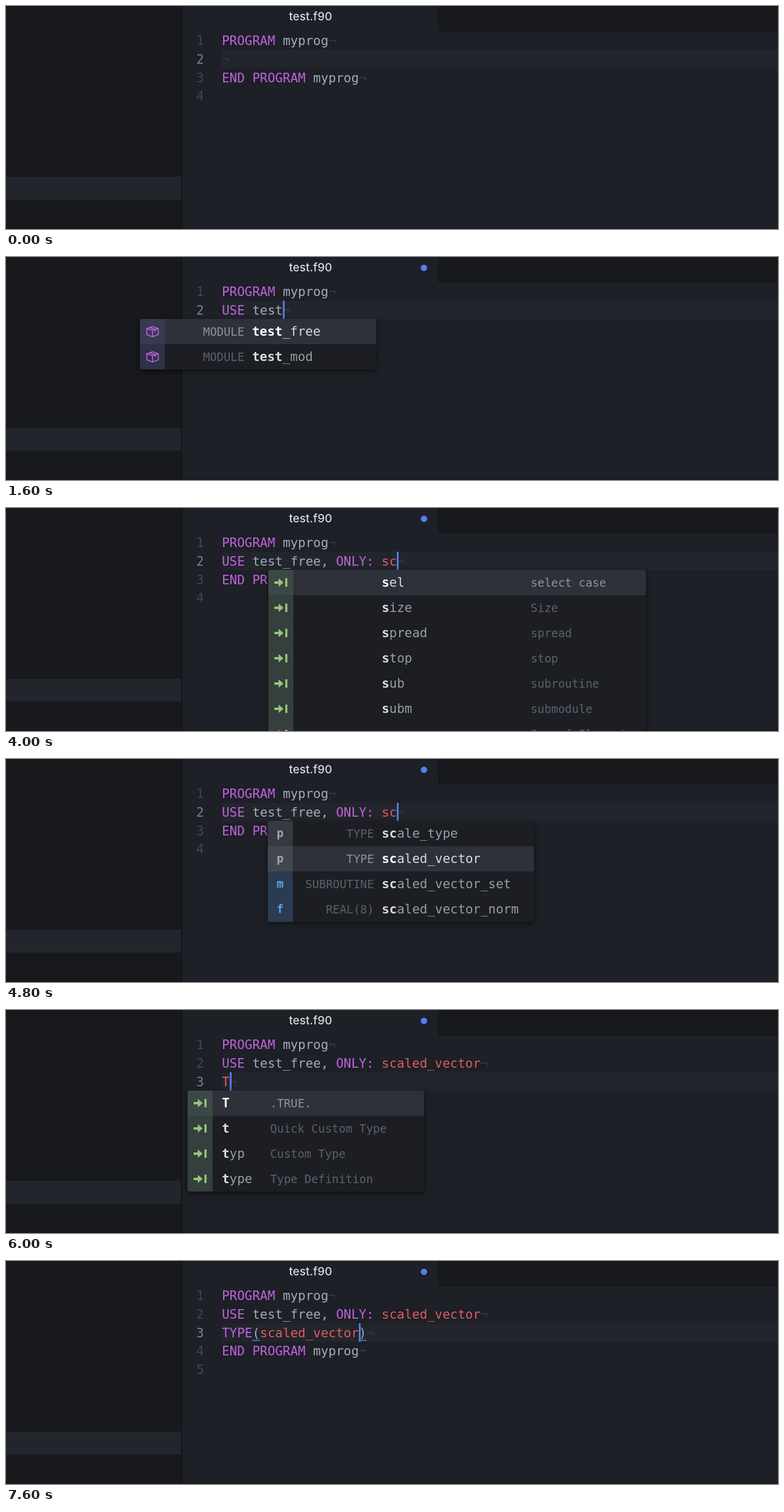
An HTML page with a canvas that plays this animation: 1280x371 px, repeating every 8000 ms.

```html
<!DOCTYPE html>
<html lang="en">
<head>
<meta charset="utf-8">
<title>Editor autocomplete</title>
<style>
  html, body { margin: 0; width: 100%; height: 100%; overflow: hidden; background: #1d2026; }
  canvas { display: block; }
</style>
</head>
<body>
<canvas id="stage" width="1280" height="371"></canvas>
<script>
const ctx = document.getElementById('stage').getContext('2d');
const MONO = '"DejaVu Sans Mono", monospace';
const CODE = `20.95px ${MONO}`, BOLD = `bold ${CODE}`, SMALL = `18.9px ${MONO}`;
const CHAR = 12.613, LEFT = 358, LINE = 30.75, ROW = 42, STEP = 400;
const COLORS = { k: '#c062de', r: '#e05a63', t: '#a3abb9' };

// Suggestion rows: kind, label, word, description
const snippet = (word, info) => ['snippet', '', word, info];
const typeRows = [
  snippet('t', 'Quick Custom Type'), snippet('typ', 'Custom Type'),
  snippet('type', 'Type Definition')];
const truth = snippet('T', '.TRUE.');
const moduleRow = ['module', 'MODULE', 'test_free', ''];
const sRows = [
  snippet('sel', 'select case'), snippet('size', 'Size'), snippet('spread', 'spread'),
  snippet('stop', 'stop'), snippet('sub', 'subroutine'), snippet('subm', 'submodule'),
  snippet('sum', 'Sum of Elements')];
const vectorType = ['p', 'TYPE', 'scaled_vector', ''];
const scRows = [
  ['p', 'TYPE', 'scale_type', ''], vectorType,
  ['m', 'SUBROUTINE', 'scaled_vector_set', ''],
  ['f', 'REAL(8)', 'scaled_vector_norm', '']];
const modRows = [moduleRow, ['module', 'MODULE', 'test_mod', '']];

const popup = (query, rows, x, y, w, wordX, infoX = 0, selected = 0) =>
  ({ query, rows, x, y, w, wordX, infoX, selected });
const modules = query => popup(query, modRows, 222, 103, 392, 408);
const vectors = selected => popup('sc', scRows, 434, 103, 441, 623, 0, selected);

// Each step: second line, inserted third line (or null), caret shown, popup
const USE = 'kUSE|t test_free';
const ONLY = USE + ',|k ONLY:|r ';
const FULL = ONLY + 'scaled_vector';
const steps = [
  ['', null, 0],
  ['', null, 1],
  ['kUSE|t t', null, 1, popup('t', [...typeRows, truth, moduleRow], 268, 103, 490, 408, 541)],
  ['kUSE|t te', null, 1, modules('te')],
  ['kUSE|t test', null, 1, modules('test')],
  [USE, null, 1],
  [USE + ', ', null, 1],
  [USE + ', |rON', null, 0, popup('on',
    [snippet('open', 'Output File'), snippet('open scratch', 'Scratch File')],
    490, 103, 392, 546.6, 722)],
  [USE + ', |rONLY', null, 1],
  [ONLY, null, 1],
  [ONLY + 'sc', null, 1, popup('s', sRows, 435, 103, 626, 623, 870)],
  [ONLY + 'sc', null, 0, vectors(0)],
  [ONLY + 'sc', null, 1, vectors(1)],
  [FULL, null, 0],
  [FULL, '', 1],
  [FULL, 'rT', 1, popup('t', [truth, ...typeRows], 301, 134, 392, 358, 438)],
  [FULL, 'kTYPE', 1],
  [FULL, 'kTYPE|t(|rs|t)', 1, popup('s', sRows, 301, 134, 497, 421, 605)],
  [FULL, 'kTYPE|t(|rscaled|t)', 1, popup('scaled', [vectorType], 280, 134, 392, 421)],
  [FULL, 'kTYPE|t(|rscaled_vector|t)', 1]
];

function rect(x, y, w, h, color) {
  ctx.fillStyle = color;
  ctx.fillRect(x, y, w, h);
}

function text(str, x, y, color, font = CODE, align = 'left') {
  ctx.font = font;
  ctx.textAlign = align;
  ctx.fillStyle = color;
  ctx.fillText(str, x, y);
}

// Draws one code line and returns its length in characters
function codeLine(line, index) {
  const y = 65 + index * LINE;
  let col = 0;
  for (const part of line.split('|').filter(Boolean)) {
    text(part.slice(1), LEFT + col * CHAR, y, COLORS[part[0]]);
    col += part.length - 1;
  }
  text('¬', LEFT + col * CHAR, y, '#343942');
  return col;
}

function drawIcon(kind, x, y) {
  if (kind === 'snippet') {
    ctx.fillStyle = '#98c379';
    ctx.fill(new Path2D(`M${x + 10} ${y - 2}h7v-5l8 7-8 7v-5h-7z M${x + 28} ${y - 7}h3.5v14h-3.5z`));
  } else if (kind === 'module') {
    ctx.strokeStyle = '#c062de';
    ctx.lineWidth = 1.6;
    ctx.stroke(new Path2D(`M${x + 11.5} ${y - 5}l9.5-3.5 9.5 3.5v10l-9.5 4-9.5-4z
      l9.5 3 9.5-3m-9.5 3v11 M${x + 16} ${y - 7}l9.5 3.5v4`));
  } else {
    text(kind, x + 20.5, y + 6, kind === 'p' ? '#a0a5ae' : '#5ba3e6',
      `bold 19px ${MONO}`, 'center');
  }
}

function drawPopup({ query, rows, x, y, w, wordX, infoX, selected }) {
  const iconColors = {
    snippet: ['#353f3c', '#3c4845'], module: ['#2f3145', '#383a4f'],
    p: ['#353940', '#42464f'], m: ['#2b3b52'], f: ['#2b3b52']
  };
  const frame = new Path2D();
  frame.roundRect(x, y, w, rows.length * ROW, 4);
  ctx.save();
  ctx.shadowColor = 'rgba(0,0,0,.55)';
  ctx.shadowBlur = 10;
  ctx.shadowOffsetY = 3;
  ctx.fillStyle = '#1c1e24';
  ctx.fill(frame);
  ctx.restore();
  ctx.save();
  ctx.clip(frame);
  rows.forEach(([kind, label, word, info], i) => {
    const top = y + i * ROW, base = top + 28, active = i === selected;
    if (active) rect(x, top, w, ROW, '#2e313a');
    rect(x, top, 41.5, ROW, iconColors[kind][+active] || iconColors[kind][0]);
    drawIcon(kind, x, top + 21);
    const dim = active ? '#8e929c' : '#5c606a';
    text(label, wordX - 13, base, dim, SMALL, 'right');
    text(info, infoX, base, dim, SMALL);
    let matched = 0;
    [...word].forEach((ch, n) => {
      const hit = ch.toLowerCase() === query[matched];
      if (hit) matched++;
      const color = hit ? (active ? '#ffffff' : '#d7dae0') : (active ? '#d7dae0' : '#989ca6');
      text(ch, wordX + n * CHAR, base, color, hit ? BOLD : CODE);
    });
  });
  ctx.restore();
}

function draw(step) {
  const [second, third, caret, list] = steps[step];
  const lines = ['kPROGRAM|t myprog', second];
  if (third !== null) lines.push(third);
  const current = lines.length - 1;
  lines.push('kEND PROGRAM|t myprog');

  rect(0, 0, 1280, 371, '#1d2026');
  rect(0, 0, 290, 371, '#17191d');
  rect(0, 284, 290, 38, '#22252c');
  rect(290, 0, 2, 371, '#121417');
  rect(717, 0, 563, 42, '#121417');
  rect(718, 0, 562, 41, '#17191d');
  rect(0, 370, 1280, 1, '#131519');
  text('test.f90', 505, 24, '#d7dae0', '500 19px Inter, sans-serif', 'center');
  if (step > 1) {
    ctx.fillStyle = '#5080f2';
    ctx.beginPath();
    ctx.arc(693, 18, 5.3, 0, 7);
    ctx.fill();
  }

  const top = 42 + current * LINE;
  rect(LEFT, top, 1280 - LEFT, LINE, '#22252c');
  for (let i = 0; i <= lines.length; i++)
    text(i + 1, 328, 65 + i * LINE, i === current ? '#7b818d' : '#414650', CODE, 'right');
  const lengths = lines.map(codeLine);
  let col = lengths[current];
  if (lines[current].endsWith(')')) {
    col--;
    for (const c of [4, col]) rect(LEFT + c * CHAR, 131.5, CHAR, 1.5, '#4f7de8');
  }
  if (caret) rect(Math.round(LEFT + col * CHAR), top, 3, LINE, '#4f7de8');
  if (list) drawPopup(list);
}

function tick() {
  draw(Math.floor(performance.now() / STEP) % steps.length);
  requestAnimationFrame(tick);
}
tick();
</script>
</body>
</html>
```
